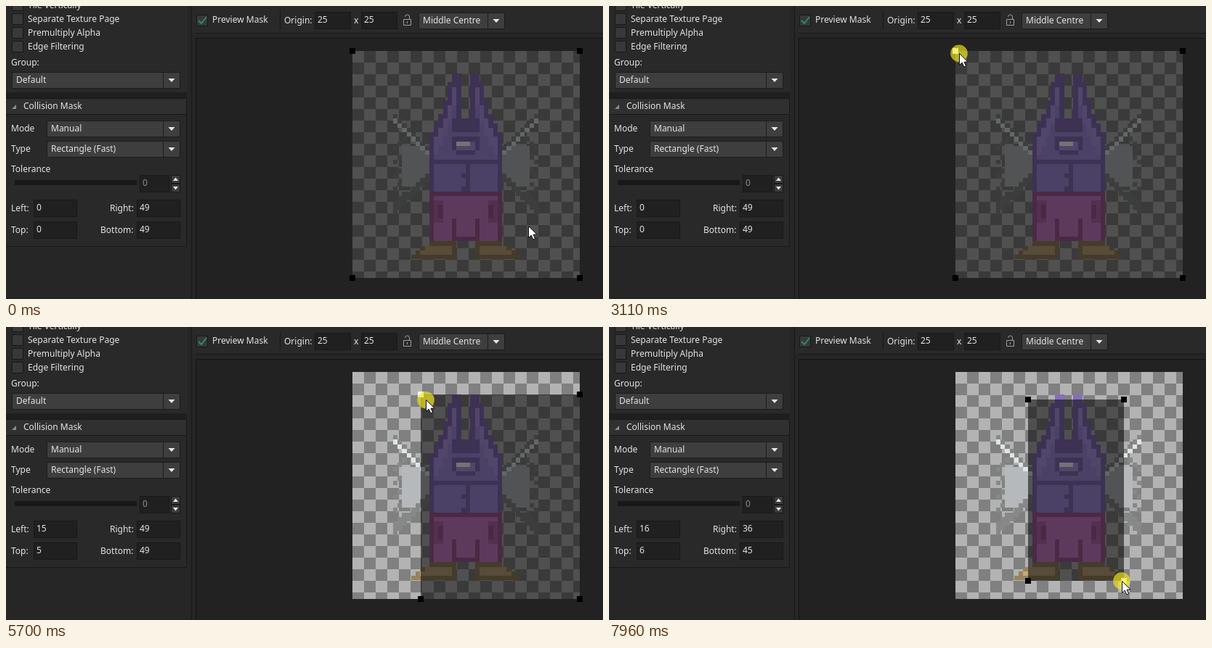
An HTML page with a canvas that plays this animation: 822x404 px, repeating every 7.99 s.

```html
<!DOCTYPE html>
<html lang="en">
<head>
<meta charset="utf-8">
<title>Collision mask editor</title>
<style>
  html, body { margin: 0; width: 100%; height: 100%; overflow: hidden; background: #262626; }
  canvas { display: block; }
</style>
</head>
<body>
<canvas width="822" height="404"></canvas>
<script>
const ctx = document.querySelector('canvas').getContext('2d');
const LOOP = 7990, UNIT = 6.26, LEFT = 477, TOP = 62, SIZE = 313;
const GRAB_START = 2880, GRAB_END = 6150, REGRAB = 6990;

// Cursor moves, each easing from wherever the last one ended
const MOVES = [
  { from: 50, to: 420, x: 576, y: 175 },
  { from: 420, to: 810, x: 685, y: 82 },
  { from: 870, to: 1620, x: 473, y: 57 },
  { from: 2840, to: 3770, x: 517, y: 95 },
  { from: 3720, to: 4620, x: 582, y: 99.5 },
  { from: 5100, to: 5270, x: 578, y: 100.2 },
  { from: 5690, to: 5880, x: 583, y: 101 },
  { from: 6120, to: 6810, x: 791, y: 371 },
  { from: 6960, to: 7170, x: 772.5, y: 365 },
  { from: 7170, to: 7960, x: 706, y: 349.6 }
];

function cursorAt(t) {
  let x = 719, y = 303;
  for (const move of MOVES) {
    const s = Math.max(0, Math.min(1, (t - move.from) / (move.to - move.from)));
    const ease = s * s * (3 - 2 * s);
    x += (move.x - x) * ease;
    y += (move.y - y) * ease;
  }
  return [x, y];
}

function rect(color, x, y, w, h) {
  ctx.fillStyle = color;
  ctx.fillRect(x, y, w, h);
}

function shape(color, ...points) {
  ctx.beginPath();
  points.forEach(([x, y]) => ctx.lineTo(x, y));
  ctx.closePath();
  ctx.fillStyle = color;
  ctx.fill();
}

function arrow(x, y, half, height) {
  shape('#e8e8e8', [x - half, y], [x + half, y], [x, y + height]);
}

function text(string, x, middle, color = '#e4e4e4') {
  ctx.font = '12px "Noto Sans", sans-serif';
  ctx.fillStyle = color;
  ctx.fillText(string, x, middle + 4);
}

function box(x, y, w, h, fill = '#202020', border = '#181818') {
  rect(border, x, y, w, h);
  rect(fill, x + 1, y + 1, w - 2, h - 2);
}

function field(value, x, y, w, color) {
  box(x, y, w, 24);
  text(value, x + 4, y + 11, color);
}

function dropdown(label, x, y, w) {
  box(x, y, w, 23, '#3e3e3e', '#1c1c1c');
  rect('#1c1c1c', x + w - 24, y + 1, 1, 21);
  text(label, x + 6, y + 11);
  arrow(x + w - 12, y + 9, 4.5, 5);
}

function drawPanel(mask) {
  rect('#262626', 0, 0, 822, 404);
  rect('#292929', 0, 0, 249, 119);
  ['Tile Vertically', 'Separate Texture Page', 'Premultiply Alpha', 'Edge Filtering'].forEach((label, i) => {
    box(8, i * 19 - 9, 16, 16, '#383838');
    text(label, 30, i * 19 - 1);
  });
  text('Group:', 7, 78);
  dropdown('Default', 8, 91, 232);

  rect('#1f1f1f', 0, 119, 249, 8);
  box(-1, 127, 250, 205, '#292929');
  box(-1, 127, 250, 23, '#303030');
  shape('#8c8c8c', [14, 136], [14, 142], [8, 142]);
  text('Collision Mask', 24, 138);
  text('Mode', 7, 169);
  dropdown('Manual', 56, 158, 184);
  text('Type', 7, 197);
  dropdown('Rectangle (Fast)', 56, 186, 184);
  text('Tolerance', 7, 225);
  rect('#181818', 12, 240, 168, 7);
  field('0', 184, 233, 41, '#8c8c8c');
  box(227, 233, 13, 12, '#3c3c3c');
  box(227, 245, 13, 12, '#3c3c3c');
  arrow(233.5, 241, 3.5, -4.5);
  arrow(233.5, 249, 3.5, 4.5);

  text('Left:', 7, 279);
  text('Right:', 143, 279);
  text('Top:', 7, 309);
  text('Bottom:', 130, 309);
  field(mask.left, 38, 267, 60);
  field(mask.right, 180, 267, 60);
  field(mask.top, 38, 297, 60);
  field(mask.bottom, 180, 297, 60);
  rect('#181818', 255, 0, 1, 404);
}

function drawToolbar() {
  rect('#292929', 256, 0, 566, 37);
  rect('#181818', 261, 37, 561, 1);
  box(262, 12, 16, 16, '#383838');
  ctx.strokeStyle = '#2a8a70';
  ctx.lineWidth = 2;
  ctx.stroke(new Path2D('M265 20l4 4 7-9'));
  text('Preview Mask', 284, 19);
  rect('#181818', 377, 8, 1, 24);
  text('Origin:', 383, 20);
  field('25', 425, 8, 50);
  text('x', 479, 20);
  field('25', 489, 8, 50);
  ctx.strokeStyle = '#a0a0a0';
  ctx.lineWidth = 1;
  ctx.stroke(new Path2D('M547.5 18.5h10v8h-10zM549.5 15a3 3 0 0 1 6 0v3M552.5 21v3'));
  dropdown('Middle Centre', 568, 9, 119);
  box(261, 44, 570, 370, '#222222', '#141414');
}

const edgeX = c => Math.floor(LEFT + c * UNIT);
const edgeY = r => Math.floor(TOP + r * UNIT);

// Positions and sizes are in sprite pixels
function block(color, c, r, w = 1, h = 1) {
  rect(color, edgeX(c), edgeY(r), edgeX(c + w) - edgeX(c), edgeY(r + h) - edgeY(r));
}

function pair(color, c, r, w = 1, h = 1) {
  block(color, c, r, w, h);
  block(color, 50 - c - w, r, w, h);
}

function drawWings() {
  for (let r = 19; r < 34; r++) pair('#868988', 9 + r * 5 % 3, r);
  for (let c = 9; c < 17; c++) {
    const low = 44 - c, high = Math.max(c + 7, 21);
    if (c > 10) pair('#b6b9bb', c, high, 1, Math.min(low, 30) - high);
    pair('#868988', c, low - 1, 1, 2);
    pair('#868988', c, c + 5);
    pair('#dfe5e6', c, c + 6);
  }
}

function drawBody() {
  const outline = '#876dbb', fur = '#a88fe3', light = '#b499ea';
  const top = i => Math.max(5, Math.round(18 - 1.7 * i - i * i / 4));
  for (let i = 0; i < 7; i++) pair(outline, 17 + i, top(i), 1, 31 - top(i));
  for (let i = 0; i < 5; i++) {
    pair(fur, 18 + i, top(i) + 1, 1, 30 - top(i));
    pair(light, 18 + i, top(i) + 1, 1, 4);
  }
  pair(outline, 22, 15, 3, 3);
  pair(fur, 23, 18, 2, 13);
  pair(outline, 17, 24, 8);
  block(outline, 25, 25, 1, 6);
  block(outline, 24, 27);
  block(outline, 24, 30);

  block(outline, 22, 19, 6, 3);
  block(outline, 23, 22, 4);
  block(light, 23, 20, 4, 2);
  block('#ffffff', 23, 20, 3);
}

function drawLegs() {
  const cloth = '#d081cf', seam = '#a55c99';
  for (let r = 42; r < 46; r++) {
    const toe = r === 42 ? 17 : 58 - r;
    pair('#98835f', toe, r, 23 - toe);
    if (r === 43 || r === 44) pair('#c4a97e', toe + 1, r, 21 - toe);
  }
  pair(seam, 17, 31, 8, 11);
  pair(cloth, 18, 32, 7, 9);
  pair(cloth, 18, 41, 4);
  pair('#b86bb2', 18, 33, 2, 5);
  pair(seam, 19, 34, 1, 3);
  pair(seam, 22, 37, 1, 5);
}

function drawStage(mask, cursor, dragging) {
  ctx.save();
  ctx.beginPath();
  ctx.rect(LEFT, TOP, SIZE, SIZE);
  ctx.clip();
  rect('#808080', LEFT, TOP, SIZE, SIZE);
  for (let r = 0; r < 20; r++)
    for (let c = r % 2; c < 20; c += 2) rect('#b3b3b3', LEFT + c * 16, TOP + r * 16, 16, 16);
  drawWings();
  drawBody();
  drawLegs();
  ctx.restore();

  const columns = [mask.left, mask.right + 1].map(c => Math.round(LEFT + c * UNIT));
  const rows = [mask.top, mask.bottom + 1].map(r => Math.round(TOP + r * UNIT));
  rect('rgba(0,0,0,.55)', columns[0], rows[0], columns[1] - columns[0], rows[1] - rows[0]);

  rows.forEach((y, j) => columns.forEach((x, i) => {
    const hover = Math.abs(cursor[0] - x) < 7 && Math.abs(cursor[1] - y) < 7;
    const active = dragging === null ? hover : dragging === 2 * j + i;
    rect(active ? '#fff' : '#000', x - 4, y - 4, 8, 8);
  }));
}

function drawCursor([x, y], pressed) {
  if (pressed) {
    ctx.fillStyle = 'rgba(240,230,30,.67)';
    ctx.beginPath();
    ctx.arc(x, y + .5, 11.8, 0, 7);
    ctx.fill();
  }
  ctx.save();
  ctx.translate(Math.round(x) + .5, Math.round(y) + .5);
  shape('#fff', [0, 0], [0, 16], [3.7, 12.6], [6.3, 18.3], [9, 17.2], [6.5, 11.6], [11.4, 11.6]);
  ctx.strokeStyle = '#111';
  ctx.lineWidth = 1;
  ctx.stroke();
  ctx.restore();
}

function cellAt(t) {
  const [x, y] = cursorAt(t);
  return [x - LEFT, y - TOP].map(d => Math.max(0, Math.min(49, Math.floor((d - .9) / UNIT))));
}

function draw(t) {
  const cursor = cursorAt(t);
  const dragging = t >= REGRAB ? 3 : t >= GRAB_START && t < GRAB_END ? 0 : null;
  const [left, top] = t < GRAB_START ? [0, 0] : cellAt(Math.min(t, GRAB_END - 50));
  const [right, bottom] = t < REGRAB ? [49, 49] : cellAt(t);
  drawPanel({ left, top, right, bottom });
  drawToolbar();
  drawStage({ left, top, right, bottom }, cursor, dragging);
  drawCursor(cursor, dragging !== null);
}

let start;
function tick(now) {
  start ??= now;
  draw((now - start) % LOOP);
  requestAnimationFrame(tick);
}
draw(0);
requestAnimationFrame(tick);
</script>
</body>
</html>
```
